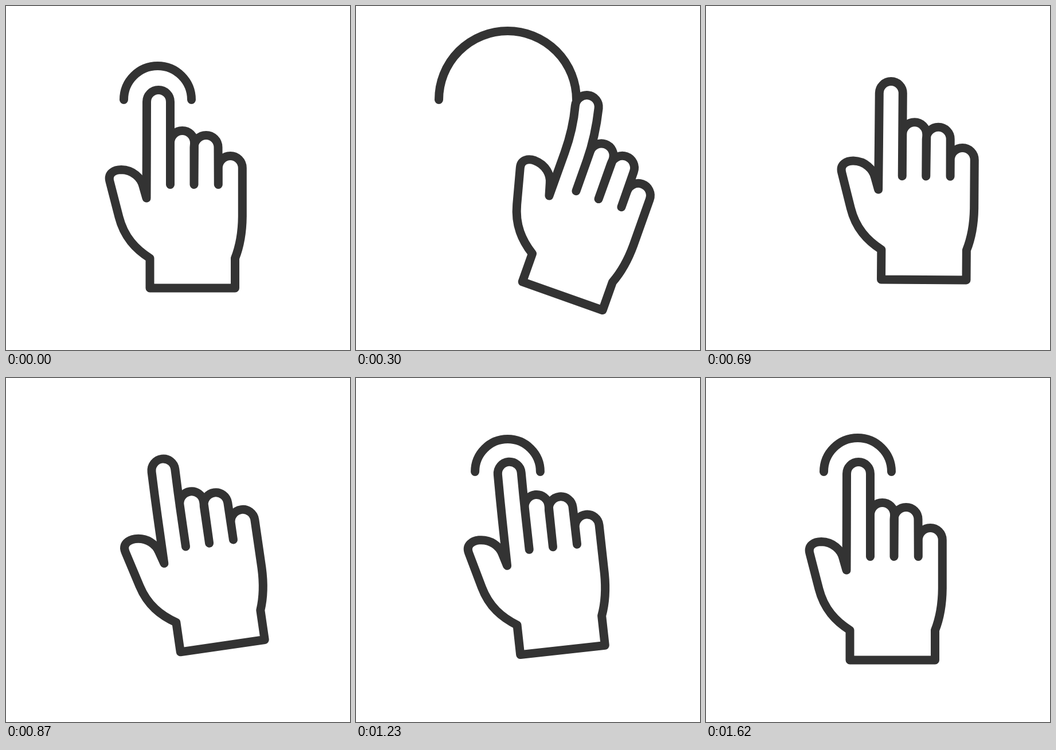
These frames come from a looping animation (600x600 px, 2.34 s). An HTML page with a canvas:

```html
<!DOCTYPE html>
<html lang="en">
<head>
<meta charset="utf-8">
<title>Tap and swipe</title>
<style>
  html, body { margin: 0; width: 100%; height: 100%; overflow: hidden; background: #fff; }
  canvas { display: block; width: 600px; height: 600px; }
</style>
</head>
<body>
<canvas id="stage" width="600" height="600"></canvas>
<script>
const ctx = document.getElementById('stage').getContext('2d');
const LOOP = 2340, STEP = 30;
const PALM = { x: 300, y: 350 };
const RIPPLE = { x: 264.5, y: 163.5 };
const KNUCKLE_Y = 255, TIP_Y = 167, FINGER_X = 266, FINGER_R = 20.5;

// time, angle, dx, dy, sideways bend of the finger, shortening of the finger
const handKeys = [
  [0, 0, 0, 0, 0, 0],
  [150, 14.3, 64.3, 1.7, -17.7, 0],
  [270, 19, 82, 11, -12, 0],
  [400, 20.5, 87, 20, -7, 0],
  [480, 19.65, 85.2, 17.9, -4.5, 0],
  [540, 17.4, 82, 14, -3, 0],
  [690, 0.4, 55.5, -14.7, 0, 0],
  [900, -8.8, 31, -20, 1, 9],
  [1040, -9.8, 29, -20.4, 1.8, 13.4],
  [1080, -9.6, 29.2, -20.3, 1.6, 13.2],
  [1380, -2.5, 7.3, -5.5, 0.2, 3.8],
  [1620, 0, 0, 0, 0, 0]
];

// time, radius
const rippleOut = [[0, 59], [150, 89], [300, 120]];
const rippleIn = [[870, 0], [960, 44], [1050, 66.3], [1080, 65.5], [1290, 55.3], [1380, 56], [1620, 59]];

function slope(keys, i, c) {
  if (i === 0 || i === keys.length - 1) return 0;
  const [a, b, d] = [keys[i - 1], keys[i], keys[i + 1]];
  const before = (b[c] - a[c]) / (b[0] - a[0]);
  const after = (d[c] - b[c]) / (d[0] - b[0]);
  return before * after > 0 ? 2 * before * after / (before + after) : 0;
}

// Monotone cubic interpolation of one column
function sample(keys, t, c) {
  const last = keys.length - 1;
  if (t >= keys[last][0]) return keys[last][c];
  let i = 0;
  while (t >= keys[i + 1][0]) i++;
  const span = keys[i + 1][0] - keys[i][0];
  const u = (t - keys[i][0]) / span, v = 1 - u;
  return v * v * (1 + 2 * u) * keys[i][c] + u * u * (3 - 2 * u) * keys[i + 1][c]
    + span * u * v * (v * slope(keys, i, c) - u * slope(keys, i + 1, c));
}

function drawRipple(t) {
  if (t > 300 && t <= 870) return;
  const r = sample(t <= 300 ? rippleOut : rippleIn, t, 1);
  ctx.beginPath();
  ctx.arc(RIPPLE.x, RIPPLE.y, r, Math.PI, 2 * Math.PI);
  ctx.stroke();
}

function indexFinger(bend, shorten) {
  const tilt = Math.atan(2 * bend / (KNUCKLE_Y - TIP_Y));
  const cx = FINGER_X + bend, cy = TIP_Y + shorten;
  const ox = FINGER_R * Math.cos(tilt), oy = FINGER_R * Math.sin(tilt);
  const left = FINGER_X - FINGER_R, right = FINGER_X + FINGER_R;
  const midY = (KNUCKLE_Y + cy) / 2;
  ctx.lineTo(left - 0.2, KNUCKLE_Y);
  ctx.quadraticCurveTo(left, midY, cx - ox, cy - oy);
  ctx.arc(cx, cy, FINGER_R, Math.PI + tilt, 2 * Math.PI + tilt);
  ctx.quadraticCurveTo(right, midY, right, KNUCKLE_Y);
}

function foldedFinger(x, y) {
  ctx.lineTo(x - 21, 311.5);
  ctx.lineTo(x - 21, y);
  ctx.arc(x, y, 21, Math.PI, 2 * Math.PI);
}

function drawHand(t) {
  const [angle, dx, dy, bend, shorten] = [1, 2, 3, 4, 5].map(c => sample(handKeys, t, c));
  ctx.save();
  ctx.translate(PALM.x + dx, PALM.y + dy);
  ctx.rotate(angle * Math.PI / 180);
  ctx.translate(-PALM.x, -PALM.y);
  ctx.beginPath();
  ctx.moveTo(251, 492);
  ctx.lineTo(251, 440);
  ctx.bezierCurveTo(226, 424, 206, 403, 197, 368);
  ctx.lineTo(181, 306);
  ctx.bezierCurveTo(177, 291, 190, 285.5, 201, 285.5);
  ctx.bezierCurveTo(222, 286, 235.5, 300, 239, 314);
  ctx.lineTo(245, 335);
  indexFinger(bend, shorten);
  foldedFinger(307.5, 238.5);
  foldedFinger(349, 246.5);
  foldedFinger(391.3, 282.5);
  ctx.lineTo(412.3, 367);
  ctx.bezierCurveTo(412, 398, 407, 421, 399.5, 440);
  ctx.lineTo(399.5, 492);
  ctx.closePath();
  ctx.fill();
  ctx.stroke();
  ctx.restore();
}

function render(now) {
  const t = Math.floor((now % LOOP) / STEP) * STEP;
  ctx.fillStyle = '#fff';
  ctx.fillRect(0, 0, 600, 600);
  ctx.strokeStyle = '#333';
  ctx.lineWidth = 15;
  ctx.lineCap = ctx.lineJoin = 'round';
  drawRipple(t);
  drawHand(t);
}

let start;
function tick(now) {
  start ??= now;
  render(now - start);
  requestAnimationFrame(tick);
}
render(0);
requestAnimationFrame(tick);
</script>
</body>
</html>
```
